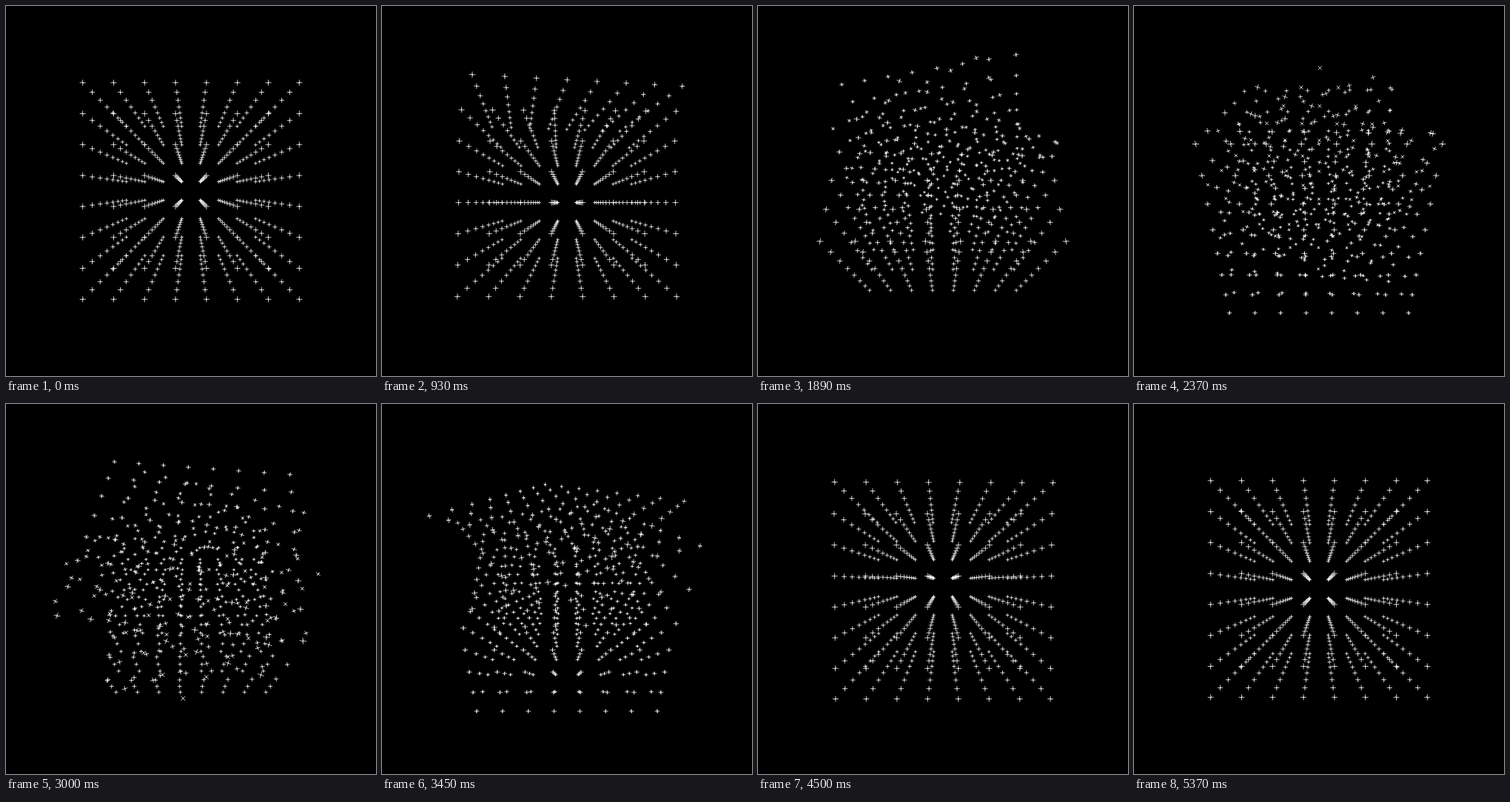
An HTML page with a canvas that plays this animation: 500 px wide and 500 px high, repeating every 5400 ms.

```html
<!DOCTYPE html>
<html lang="en">
<head>
<meta charset="utf-8">
<title>Twisting lattice</title>
<style>
  html, body { margin: 0; width: 100%; height: 100%; overflow: hidden; background: #000; }
  canvas { display: block; width: 500px; height: 500px; }
</style>
</head>
<body>
<canvas id="stage" width="500" height="500"></canvas>
<script>
const ctx = document.getElementById('stage').getContext('2d');
const LOOP = 5400, STEP = 30;
const N = 8, GAP = 31.25, ARM = 3;
const MID = 250, EYE = MID / Math.tan(Math.PI / 6);
const START = 8, SPAN = 162; // moving part of the loop, in steps

const clamp = v => Math.min(1, Math.max(0, v));
const ease = p => p < 0.5 ? 4 * p ** 3 : 1 - 4 * (1 - p) ** 3;
const coord = i => (i - (N - 1) / 2) * GAP;

// Twist about the vertical axis, then tumble about the horizontal one
function turn([x, y, z], twist, tumble) {
  const ct = Math.cos(twist), st = Math.sin(twist);
  const cu = Math.cos(tumble), su = Math.sin(tumble);
  const w = z * ct - x * st;
  return [x * ct + z * st, y * cu - w * su, w * cu + y * su];
}

function project(x, y, z) {
  const s = EYE / (EYE - z);
  return [MID + x * s, MID + y * s];
}

function drawLine([x, y, z], [dx, dy, dz]) {
  ctx.beginPath();
  ctx.moveTo(...project(x - dx, y - dy, z - dz));
  ctx.lineTo(...project(x + dx, y + dy, z + dz));
  ctx.stroke();
}

function draw(step) {
  const p = clamp((step - START) / SPAN);
  const tumble = Math.PI * ease(p);

  ctx.fillStyle = '#000';
  ctx.fillRect(0, 0, 500, 500);
  ctx.lineWidth = 1;
  ctx.strokeStyle = 'rgba(255,255,255,0.75)';

  for (let j = 0; j < N; j++) {
    const twist = Math.PI / 2 * ease(clamp(2 * p - j / N));
    const arms = [[ARM, 0, 0], [0, ARM, 0], [0, 0, ARM]].map(a => turn(a, twist, tumble));
    for (let i = 0; i < N; i++) {
      for (let k = 0; k < N; k++) {
        const at = turn([coord(i), coord(j), coord(k)], twist, tumble);
        arms.forEach(a => drawLine(at, a));
      }
    }
  }
}

let shown = -1;
function tick() {
  const step = Math.floor(performance.now() % LOOP / STEP);
  if (step !== shown) draw(shown = step);
  requestAnimationFrame(tick);
}
tick();
</script>
</body>
</html>
```
